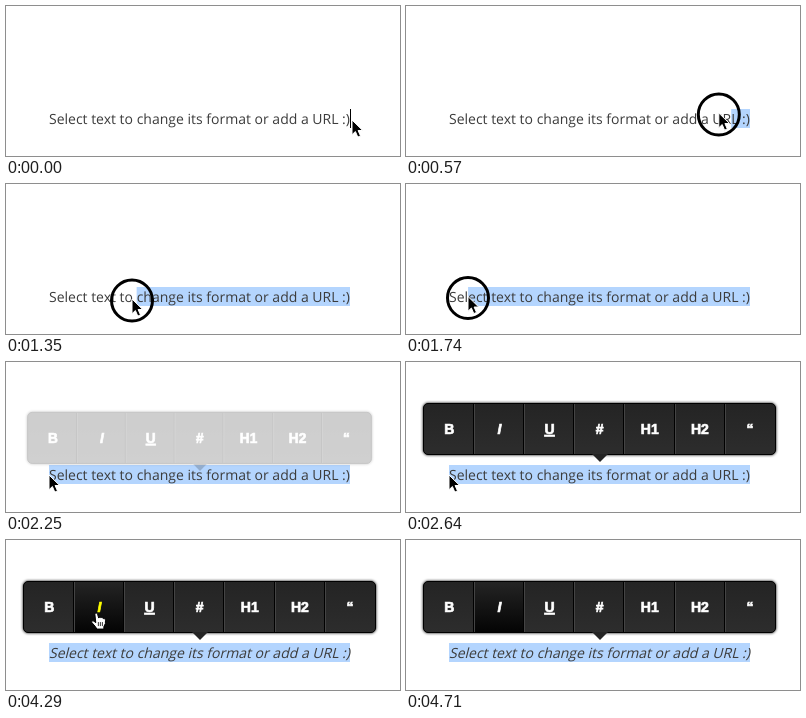
Recreate the animation shown at these times as an HTML page. Size 394x150 px, loop 5.22 s.

```html
<!DOCTYPE html>
<html lang="en">
<head>
<meta charset="utf-8">
<title>Text selection toolbar</title>
<style>
  html, body { margin: 0; width: 100%; height: 100%; overflow: hidden; background: #fff; }
  svg { display: block; }
  #line { font: 14px "Open Sans", sans-serif; fill: #3c3c3c; white-space: pre; text-rendering: geometricPrecision; }
  #panel { filter: drop-shadow(0 0 1.5px #000); }
  #buttons text {
    font: bold 14px "Liberation Sans", Arial, sans-serif; text-anchor: middle;
    color: #fff; fill: currentColor; stroke: currentColor; stroke-width: .7px;
  }
</style>
</head>
<body>
<svg width="394" height="150" viewBox="0 0 394 150">
  <defs>
    <linearGradient id="face" x2="0" y2="1">
      <stop stop-color="#242424"/><stop offset="1" stop-color="#2d2d2d"/>
    </linearGradient>
    <linearGradient id="pressed" x2="0" y2="1">
      <stop stop-color="#242424"/><stop offset="1" stop-color="#040404"/>
    </linearGradient>
  </defs>
  <rect id="selection" y="103" height="19" fill="#b4d5fe"/>
  <text id="line" x="43" y="118">Select text to change its format or add a URL :)</text>
  <rect id="caret" x="344" y="103" width="1" height="19"/>
  <g id="toolbar">
    <rect id="panel" x="17.5" y="41.5" width="352" height="51" rx="4.5" fill="url(#face)" stroke="#000"/>
    <path d="M186 92h16l-8 8z" fill="#242424"/>
    <rect id="active" x="68" y="42" width="50" height="50"/>
    <g id="buttons"></g>
  </g>
  <g id="pointer" stroke-linejoin="round">
    <circle id="ring" cy="1.5" r="20.5" fill="none" stroke="#000" stroke-width="3"/>
    <path id="arrow" d="M0 0V14.7L3.4 11.5 5.8 17.1 8.5 15.9 6.1 10.5H10.7Z" stroke="#fff"/>
    <g id="hand" fill="#fff" stroke="#000">
      <path d="M-1 1C-.7-.5 1.3-.5 1.7 1L2.8 5C3.5 4 4.3 4.1 5 4.7 6 4.2 7 4.4 7.5 5.6 8.8 5.2 9.5 6 9.6 7.2L9.5 10.5 8 13.5V16H1L-.5 13.5-4 9.5C-4.7 8-3.1 7.2-1.9 8.2L-.1 9.6Z"/>
      <path d="M2.5 9v4M4.5 9v4M6.5 9v4" stroke-width=".8"/>
    </g>
  </g>
</svg>
<script>
const LOOP = 5220, STEP = 30;
const ui = {};
document.querySelectorAll("[id]").forEach(el => ui[el.id] = el);

// Pointer path: time, x, y
const path = [
  [0, 346, 114], [120, 346, 115], [390, 346, 115], [500, 330, 110], [620, 299, 106],
  [870, 234, 112.5], [930, 219, 113.5], [1350, 126, 115], [1470, 105, 115],
  [1740, 62, 112.5], [2040, 43, 113], [2790, 43, 113], [3060, 66, 96],
  [3330, 86, 75], [3510, 89, 72], [4260, 89, 72], [4410, 105, 89],
  [4560, 160, 120], [4710, 238, 153], [LOOP, 238, 153]
];

// Toolbar pop: progress, opacity, x scale, y offset
const pop = [[0, 0, .97, 12], [.2, .7, .99, 2], [.4, 1, 1, -1], [1, 1, 1, 0]];

const labels = ["B", "I", "U", "#", "H1", "H2", "“"];
ui.buttons.innerHTML = labels.map((label, i) => {
  const x = 43.4 + i * 50.1;
  const style = label === "I" ? "font-style:italic" : label === "U" ? "text-decoration:underline" : "";
  const edge = 67 + Math.floor(i * 50.3);
  const divider = i < 6
    ? `<path d="M${edge + .5} 42v50" stroke="#000"/><path d="M${edge + 1.5} 42v50" stroke="#444"/>` : "";
  return `${divider}<text x="${x}" y="72" style="${style}">${label}</text>`;
}).join("");
const italicLabel = ui.buttons.querySelectorAll("text")[1];

const segment = (keys, at) => {
  let i = 0;
  while (i < keys.length - 2 && at >= keys[i + 1][0]) i++;
  return i;
};

function slope(i, axis) {
  const rate = k => (path[k + 1][axis] - path[k][axis]) / (path[k + 1][0] - path[k][0]);
  if (i === 0 || i === path.length - 1) return 0;
  const a = rate(i - 1), b = rate(i);
  return a * b <= 0 ? 0 : 2 * a * b / (a + b);
}

function pointerAt(t, axis) {
  const i = segment(path, t), a = path[i], b = path[i + 1];
  const span = b[0] - a[0], u = (t - a[0]) / span;
  return a[axis] * (1 + 2 * u) * (1 - u) ** 2 + b[axis] * u * u * (3 - 2 * u)
    + span * u * (1 - u) * (slope(i, axis) * (1 - u) - slope(i + 1, axis) * u);
}

function popAt(p) {
  const i = segment(pop, p), a = pop[i], b = pop[i + 1];
  const u = Math.min(1, (p - a[0]) / (b[0] - a[0]));
  return a.map((v, k) => v + (b[k] - v) * u);
}

// The selection trails the pointer and snaps to the nearest letter edge
function selectionStart(t) {
  const x = pointerAt(t - 36, 1);
  let best = 344;
  for (let i = 0; i < ui.line.getNumberOfChars(); i++) {
    const edge = ui.line.getStartPositionOfChar(i).x;
    if (Math.abs(edge - x) < Math.abs(best - x)) best = edge;
  }
  return best;
}

const show = (el, on) => el.style.display = on ? "" : "none";

function draw(t) {
  const x = pointerAt(t, 1), y = pointerAt(t, 2);
  const start = t < 420 ? 344 : t > 2085 ? 43 : selectionStart(t);
  const hover = t > 2790 && y < 93 && x > 67 && x < 118;
  const italic = t >= 3810;

  ui.selection.setAttribute("x", start);
  ui.selection.setAttribute("width", 344 - start);
  show(ui.caret, start >= 344);
  ui.line.setAttribute("transform", italic ? "translate(0 118) skewX(-14) translate(0 -118)" : "");

  const [, opacity, scale, shift] = popAt(Math.max(0, (t - 2240) / 160));
  ui.toolbar.setAttribute("opacity", opacity);
  ui.toolbar.setAttribute("transform", `translate(${193.5 * (1 - scale)} ${shift}) scale(${scale} 1)`);
  show(ui.active, hover || italic);
  ui.active.setAttribute("fill", italic ? "url(#pressed)" : "#212121");
  italicLabel.style.color = hover ? "#ff0" : "#fff";

  ui.pointer.setAttribute("transform", `translate(${x} ${y})`);
  show(ui.pointer, t < 4710);
  show(ui.ring, (t >= 420 && t < 2250) || (t >= 3720 && t < 3810));
  show(ui.arrow, !hover);
  show(ui.hand, hover);
}

const begin = performance.now();
function tick() {
  const t = (performance.now() - begin) % LOOP;
  draw(Math.floor(t / STEP) * STEP);
  requestAnimationFrame(tick);
}
tick();
</script>
</body>
</html>
```
